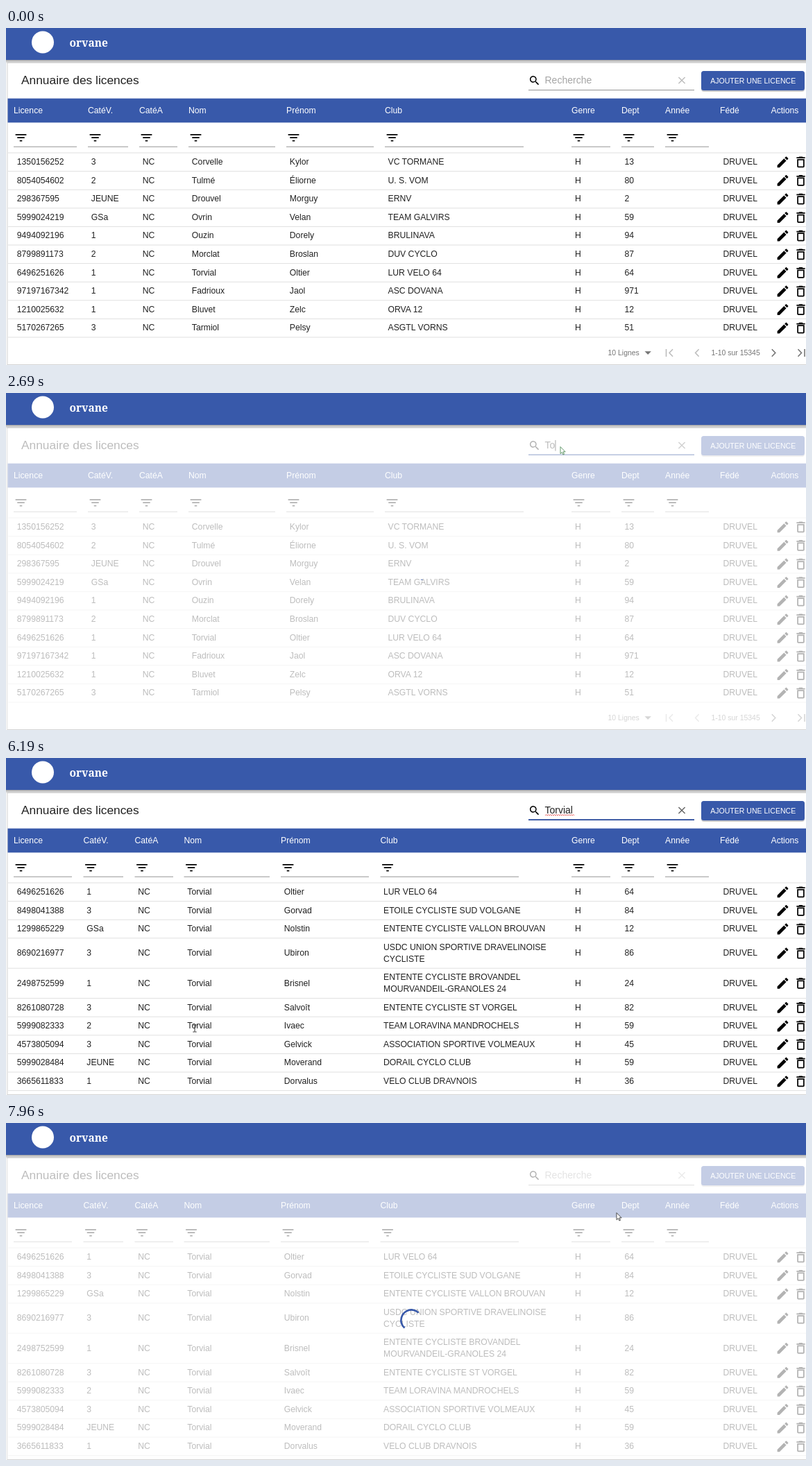
These frames come from a looping animation (1153 by 486 pixels, 8000 ms). An HTML page:

```html
<!DOCTYPE html>
<html lang="fr">
<head>
<meta charset="utf-8">
<title>Annuaire des licences</title>
<style>
html, body { margin: 0; width: 100%; height: 100%; overflow: hidden; background: #fafafa; }
svg { display: block; width: 1153px; height: 486px; font-family: "Liberation Sans", Arial, sans-serif; }
text { white-space: pre; }
</style>
</head>
<body>
<svg id="stage" viewBox="0 0 1153 486" xmlns="http://www.w3.org/2000/svg"></svg>
<script>
const LOOP = 8000, BLUE = '#3859aa', INK = '#212121', QUERY = 'Torvial', FED = 'DRUVEL';
const HEADS = ['Licence', 'CatéV.', 'CatéA', 'Nom', 'Prénom', 'Club', 'Genre', 'Dept', 'Année', 'Fédé', 'Actions'];
const FIXED = [815, 887, 950, 1029, 1102.5];
const FIXED_ENDS = [871, 934, 1013];
const ROW = 26.6, TALL = 43.4, TOP = 180;

const ICONS = {
  filter: 'M10 18h4v-2h-4v2zM3 6v2h18V6H3zm3 7h12v-2H6v2z',
  edit: 'M3 17.25V21h3.75L17.81 9.94l-3.75-3.75L3 17.25zM20.71 7.04c.39-.39.39-1.02 0-1.41l-2.34-2.34c-.39-.39-1.02-.39-1.41 0l-1.83 1.83 3.75 3.75 1.83-1.83z',
  trash: 'M6 19c0 1.1.9 2 2 2h8c1.1 0 2-.9 2-2V7H6v12zM8 9h8v10H8V9zm7.5-5l-1-1h-5l-1 1H5v2h14V4z',
  search: 'M15.5 14h-.79l-.28-.27C15.41 12.59 16 11.11 16 9.5 16 5.91 13.09 3 9.5 3S3 5.91 3 9.5 5.91 16 9.5 16c1.61 0 3.09-.59 4.23-1.57l.27.28v.79l5 4.99L20.49 19l-4.99-5zm-6 0C7.01 14 5 11.99 5 9.5S7.01 5 9.5 5 14 7.01 14 9.5 11.99 14 9.5 14z',
  close: 'M19 6.41L17.59 5 12 10.59 6.41 5 5 6.41 10.59 12 5 17.59 6.41 19 12 13.41 17.59 19 19 17.59 13.41 12z'
};

// licence | category | last name | first name | club | department
const ALL = `1350156252|3|Corvelle|Kylor|VC TORMANE|13
8054054602|2|Tulmé|Éliorne|U. S. VOM|80
298367595|JEUNE|Drouvel|Morguy|ERNV|2
5999024219|GSa|Ovrin|Velan|TEAM GALVIRS|59
9494092196|1|Ouzin|Dorely|BRULINAVA|94
8799891173|2|Morclat|Broslan|DUV CYCLO|87
6496251626|1|Torvial|Oltier|LUR VELO 64|64
97197167342|1|Fadrioux|Jaol|ASC DOVANA|971
1210025632|1|Bluvet|Zelc|ORVA 12|12
5170267265|3|Tarmiol|Pelsy|ASGTL VORNS|51`;
const FOUND = `6496251626|1|Torvial|Oltier|LUR VELO 64|64
8498041388|3|Torvial|Gorvad|ETOILE CYCLISTE SUD VOLGANE|84
1299865229|GSa|Torvial|Nolstin|ENTENTE CYCLISTE VALLON BROUVAN|12
8690216977|3|Torvial|Ubiron|USDC UNION SPORTIVE DRAVELINOISE/CYCLISTE|86
2498752599|1|Torvial|Brisnel|ENTENTE CYCLISTE BROVANDEL/MOURVANDEIL-GRANOLES 24|24
8261080728|3|Torvial|Salvoît|ENTENTE CYCLISTE ST VORGEL|82
5999082333|2|Torvial|Ivaec|TEAM LORAVINA MANDROCHELS|59
4573805094|3|Torvial|Gelvick|ASSOCIATION SPORTIVE VOLMEAUX|45
5999028484|JEUNE|Torvial|Moverand|DORAIL CYCLO CLUB|59
3665611833|1|Torvial|Dorvalus|VELO CLUB DRAVNOIS|36`;

const text = (x, y, s, size = 12.2, fill = INK, extra = '') =>
  `<text x="${x}" y="${y}" font-size="${size}" fill="${fill}" ${extra}>${s}</text>`;
const rect = (x, y, w, h, fill, extra = '') =>
  `<rect x="${x}" y="${y}" width="${w}" height="${h}" fill="${fill}" ${extra}/>`;
const icon = (name, cx, cy, k, fill = '#000', extra = '') =>
  `<path d="${ICONS[name]}" fill="${fill}" transform="translate(${cx - 12 * k} ${cy - 12 * k}) scale(${k})" ${extra}/>`;
const line = (d, color) => `<path d="${d}" fill="none" stroke="${color}" stroke-width="1.6"/>`;

function table(id, lefts, ends, data) {
  const xs = lefts.concat(FIXED), rights = ends.concat(FIXED_ENDS);
  let out = '';
  HEADS.forEach((h, i) => out += text(xs[i], 123, h, 12.2, '#fff'));
  rights.forEach((r, i) => {
    out += icon('filter', xs[i] + 10.5, 158.2, .875) + rect(xs[i], 170.8, r - xs[i], .9, '#8c8c8c');
  });
  let y = TOP;
  out += rect(3, y - .5, 1150, 1, '#e0e0e0');
  for (const row of data.split('\n')) {
    const [num, cat, last, first, club, dept] = row.split('|');
    const lines = club.split('/'), h = lines.length > 1 ? TALL : ROW;
    const mid = y + h / 2 - .5, base = mid + 4.2;
    [num, cat, 'NC', last, first].forEach((s, i) => out += text(xs[i] + 4.8, base, s));
    lines.forEach((s, i) => out += text(xs[5] + 4.5, base + (i - (lines.length - 1) / 2) * 17.2, s));
    out += text(820, base, 'H') + text(891.5, base, dept) + text(1033.5, base, FED);
    out += icon('edit', 1119.5, mid + .5, .875) + icon('trash', 1145.5, mid + .5, .875);
    y += h;
    out += rect(3, y - .5, 1150, 1, '#e0e0e0');
  }
  return `<g id="${id}">${out}</g>`;
}

const pager = text(867.5, 472, '10 Lignes', 10.45, '#757575')
  + '<path d="M920.5 466.3h9.4l-4.7 4.7z" fill="#757575"/>'
  + line('M951.5 463v11M961 463.2l-5 5.3 5 5.3M998.6 463.2l-5 5.3 5 5.3', '#bdbdbd')
  + text(1016.5, 472, '1-10 sur 15345', 10.45, '#757575')
  + line('M1103.8 463.2l5 5.3-5 5.3M1141.5 463.2l5 5.3-5 5.3M1151 463v11', '#757575');

const stage = document.getElementById('stage');
stage.innerHTML = `
<defs>
  <linearGradient id="drop" x2="0" y2="1">
    <stop offset="0" stop-color="#000" stop-opacity=".34"/><stop offset="1" stop-color="#000" stop-opacity="0"/>
  </linearGradient>
</defs>
${rect(0, 0, 1153, 486, '#fafafa')}
${rect(2, 50, 1160, 435.5, '#fff', 'stroke="#d4d4d4"')}
${rect(0, 46, 1153, 5, 'url(#drop)')}
${rect(0, 0, 1153, 46, BLUE)}
<circle cx="53" cy="20.5" r="16" fill="#fff"/>
${text(91.5, 26.7, 'orvane', 15.5, '#fff', 'font-weight="600" font-family="Noto Serif, serif"')}
${text(22, 81.3, 'Annuaire des licences', 17.35)}
${icon('search', 761.7, 75.8, .75)}
${rect(753, 89, 239, 1, '#949494')}
${rect(753, 88.2, 239, 1.8, INK, 'id="hover"')}
${rect(-119.5, 88.2, 239, 1.8, '#2c4c9c', 'id="focus"')}
<circle id="halo" cx="974" cy="75.5" r="17" fill="#000" opacity=".05"/>
${icon('close', 974, 75.5, .73, '#bdbdbd', 'id="clear"')}
${text(776.5, 80, '', 14, INK, 'id="field"')}
<path id="spell" d="M777 83${'l1.5 -1.5l1.5 1.5'.repeat(14)}" fill="none" stroke="#e53935" stroke-width=".8"/>
${rect(0, 68, 1.2, 15.5, '#111', 'id="caret"')}
${rect(1002, 64, 149, 28, '#000', 'rx="4" opacity=".2"')}
${rect(1002, 62, 149, 28, BLUE, 'rx="3.5"')}
${text(1076.7, 79.7, 'AJOUTER UNE LICENCE', 10.55, '#fff', 'text-anchor="middle"')}
${rect(2.5, 101.6, 1151, 34.8, BLUE)}
${table('all', [11, 118, 192, 263, 404, 546], [102, 176, 247, 388, 530, 746], ALL)}
${table('found', [11, 111.5, 185.5, 256.5, 396, 539.5], [95, 169, 241, 380, 523, 739], FOUND)}
<g id="pager">${pager}</g>
<g id="busy">
  ${rect(2, 51, 1151, 434, '#fff', 'opacity=".7"')}
  <circle id="spin" r="20.2" fill="none" stroke="${BLUE}" stroke-width="3.6"/>
</g>
<path id="arrow" d="M0 0v11.5l2.7-2.5 1.8 4 1.8-.8-1.8-3.9h3.6z" fill="#fff" stroke="#222" stroke-width=".9"/>
<path id="beam" d="M-2.6-5h1.9l.7.6.7-.6h1.9M-2.6 5h1.9l.7-.6.7.6h1.9M0-4.4v8.8" fill="none" stroke="#222" stroke-width=".95"/>`;

const el = {};
stage.querySelectorAll('[id]').forEach(n => el[n.id] = n);
const show = (node, on) => node.setAttribute('display', on ? 'inline' : 'none');
const within = (t, ...spans) => spans.some(([a, b]) => t >= a && t < b);
const clamp = v => Math.max(0, Math.min(1, v));

// CSS ease-in-out: cubic-bezier(.42, 0, .58, 1)
function ease(x) {
  let lo = 0, hi = 1, s = .5;
  for (let i = 0; i < 20; i++) {
    s = (lo + hi) / 2;
    const px = 3 * s * (1 - s) * (1 - s) * .42 + 3 * s * s * (1 - s) * .58 + s * s * s;
    if (px < x) lo = s; else hi = s;
  }
  return s * s * (3 - 2 * s);
}

const KEYS = [2460, 2690, 2840, 3030, 3220, 3400, 3600];
const FOCUS = 725, RESULT = 4400, CLEAR = 7190, RELOAD = 7555, BLINK = 512;
const PATH = [[150, 1000, 300], [680, 800, 78], [4550, 800, 78], [4800, 792, 62], [5310, 452, 186],
  [6190, 272, 390], [6260, 272, 390], [6340, 274, 402], [6490, 274, 402], [6950, 974, 75],
  [7520, 974, 75], [7960, 881, 130], [8000, 879, 132]];

function pointer(t) {
  const i = Math.max(1, PATH.findIndex(p => p[0] > t));
  const [t0, x0, y0] = PATH[i - 1], [t1, x1, y1] = PATH[i];
  const k = ease(clamp((t - t0) / (t1 - t0)));
  return [x0 + (x1 - x0) * k, y0 + (y1 - y0) * k];
}

function spinner(ms, cy) {
  const p = ms % 1400 / 1400;
  const grow = ease(clamp(p * 2)), slide = ease(clamp(p * 2 - 1));
  el.spin.setAttribute('stroke-dasharray', `${1 + 99 * grow} 200`);
  el.spin.setAttribute('stroke-dashoffset', -15 * grow - 110 * slide);
  el.spin.setAttribute('transform', `translate(584.3 ${cy}) scale(.735) rotate(${p * 360})`);
}

function render(t) {
  const found = t >= RESULT, focused = within(t, [FOCUS, CLEAR]);
  const typed = t < CLEAR ? KEYS.filter(k => k <= t).length : 0;
  show(el.all, !found);
  show(el.pager, !found);
  show(el.found, found);

  el.field.textContent = typed ? QUERY.slice(0, typed) : 'Recherche';
  el.field.setAttribute('fill', typed ? INK : '#a5a5a5');
  el.clear.setAttribute('fill', typed ? '#666' : '#bdbdbd');
  show(el.spell, found && typed);
  show(el.halo, within(t, [6900, CLEAR]));
  show(el.hover, within(t, [610, FOCUS + 200], [CLEAR, RELOAD]));
  const grow = focused ? clamp((t - FOCUS) / 200) : 0;
  el.focus.setAttribute('transform', `translate(872.5 0) scale(${grow} 1)`);

  const since = t - (typed ? KEYS[typed - 1] : FOCUS);
  show(el.caret, focused && Math.floor(since / BLINK) % 2 === 0);
  el.caret.setAttribute('x', 776.5 + (typed ? el.field.getComputedTextLength() : 0));

  const first = within(t, [KEYS[1], RESULT]), again = t >= RELOAD;
  show(el.busy, first || again);
  if (first) spinner(t - KEYS[1], 268.8);
  if (again) spinner(t - RELOAD, 284.3);

  const [x, y] = pointer(t), beam = within(t, [620, 2690], [3500, 4700], [5950, 6300], [CLEAR, RELOAD]);
  show(el.beam, beam);
  show(el.arrow, !beam && t > 150);
  el.arrow.setAttribute('stroke', first ? '#3a7d44' : '#222');
  el.beam.setAttribute('transform', `translate(${x} ${y})`);
  el.arrow.setAttribute('transform', `translate(${x - 1} ${y - .5}) scale(.88)`);
}

const start = performance.now();
function tick() {
  render((performance.now() - start) % LOOP);
  requestAnimationFrame(tick);
}
tick();
</script>
</body>
</html>
```
